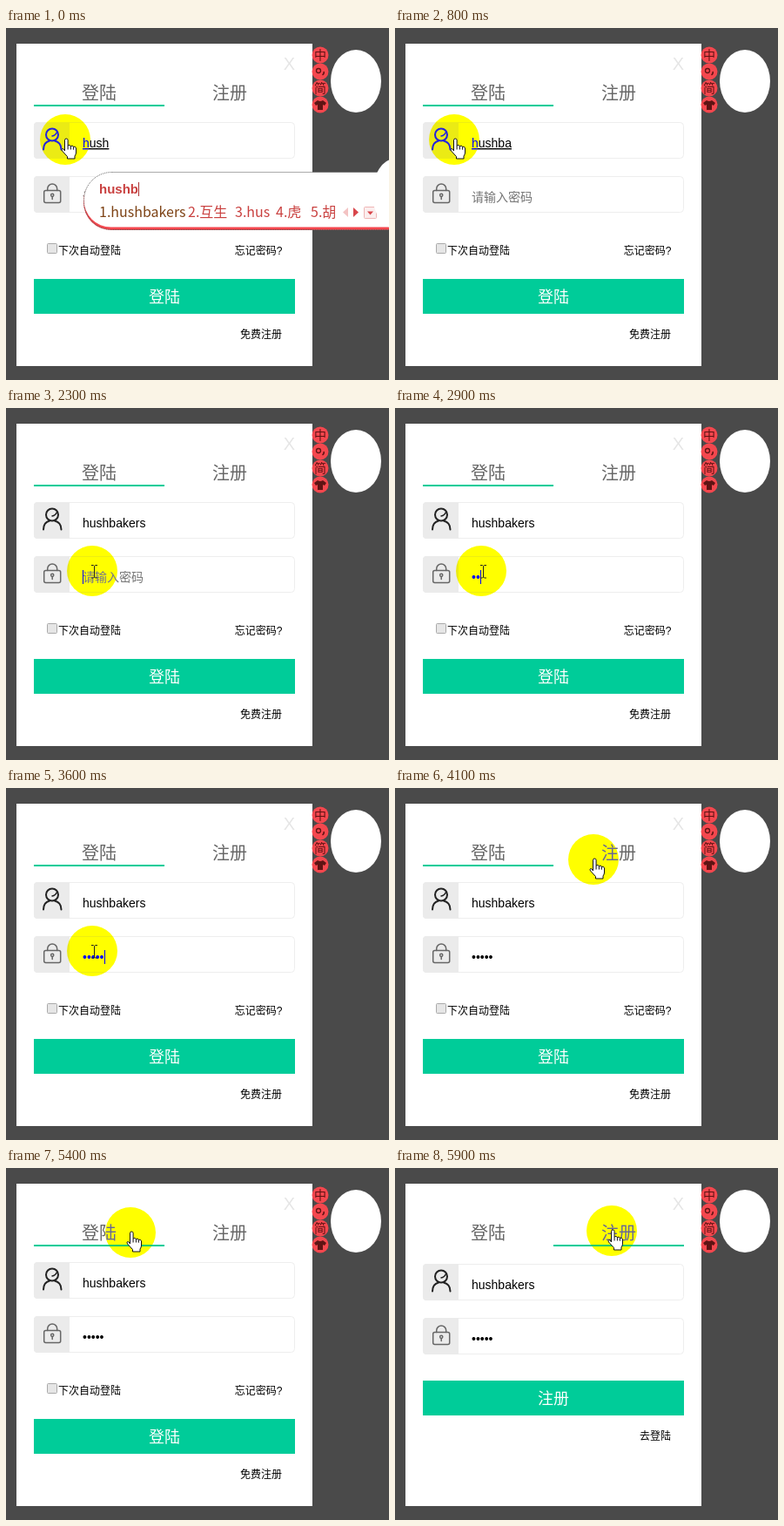
An HTML page that plays this animation: 440 px wide and 404 px high, repeating every 6000 ms.

```html
<!DOCTYPE html>
<html lang="zh-CN">
<head>
<meta charset="utf-8">
<title>登陆</title>
<style>
  html, body { margin: 0; width: 100%; height: 100%; overflow: hidden; background: #4a4a4a; }
  svg { display: block; isolation: isolate; }
  text { font-family: "Liberation Sans", Arial, "Noto Sans CJK SC", "Noto Sans CJK", sans-serif; white-space: pre; }
  .tab { font-size: 20px; fill: #666; text-anchor: middle; }
  .field { font-size: 14px; fill: #000; }
  .small { font-size: 12px; fill: #000; }
  .end { text-anchor: end; }
  .button { font-size: 18px; fill: #fff; text-anchor: middle; }
  .green { fill: #00cc99; }
  .line { fill: none; stroke: #222; stroke-width: 2; stroke-linecap: round; }
  .lock { stroke: #666; stroke-width: 1.5; }
  .cand { font: 16px "Noto Sans CJK SC", "Noto Sans CJK", sans-serif; fill: #c9403f; }
  .badge { font-size: 14px; fill: #5e1414; text-anchor: middle; }
  #spot { fill: #00f; mix-blend-mode: difference; }
  #typed.composing { text-decoration: underline; }
</style>
</head>
<body>
<svg width="440" height="404" viewBox="0 0 440 404">
  <defs>
    <g id="box">
      <rect x="32.5" y="108.5" width="299" height="41" rx="4" fill="#fff" stroke="#eee"/>
      <path d="M73 108H36a4 4 0 0 0-4 4v34a4 4 0 0 0 4 4h37z" fill="#ebebeb"/>
    </g>
  </defs>

  <rect width="440" height="404" fill="#4a4a4a"/>
  <rect x="12" y="18" width="340" height="370" fill="#fff"/>
  <text x="325.5" y="48" font-size="20" fill="#e6e6e6" text-anchor="middle">X</text>
  <text class="tab" x="107" y="82">登陆</text>
  <text class="tab" x="257" y="82">注册</text>
  <rect id="bar" class="green" x="32" y="88" width="150" height="2"/>

  <g id="fields">
    <use href="#box"/>
    <g class="line">
      <circle cx="53" cy="122.5" r="7"/>
      <path d="M43 139.5c0-6 3-9 7-10M63.5 139.5c0-6-3.5-9-7.5-10"/>
      <path d="M53 124c3-.5 4.500-2 5.500-4.500" stroke-width="1.500"/>
    </g>
    <text id="typed" class="field" x="88" y="137"></text>

    <use href="#box" y="62"/>
    <g class="line lock">
      <rect x="43.700" y="186.500" width="19" height="14" rx="2"/>
      <path d="M47.700 186.500v-2a5.500 5.500 0 0 1 11 0v2M53.200 193.500v3"/>
      <circle cx="53.200" cy="191.800" r="1.600"/>
    </g>
    <text id="hint" class="field" x="88" y="199" style="fill:#757575">请输入密码</text>
    <text id="dots" class="field" x="88" y="199"></text>
    <rect id="caret" y="186" width="1" height="16"/>
  </g>

  <g id="login">
    <rect x="47.500" y="247.500" width="11" height="11" rx="1" fill="#e6e6e6" stroke="#aaa"/>
    <text class="small" x="60" y="260">下次自动登陆</text>
    <text class="small end" x="317.500" y="260">忘记密码?</text>
    <rect class="green" x="32" y="288" width="300" height="40"/>
    <text class="button" x="182" y="315">登陆</text>
    <text class="small end" x="317" y="356">免费注册</text>
  </g>
  <g id="register">
    <rect class="green" x="32" y="244" width="300" height="40"/>
    <text class="button" x="182" y="271">注册</text>
    <text class="small end" x="317" y="312">去登陆</text>
  </g>

  <!-- input method bar -->
  <g fill="#f4474e">
    <circle cx="361" cy="31" r="9.500"/>
    <circle cx="361" cy="50" r="9.500"/>
    <circle cx="361" cy="69" r="9.500"/>
    <circle cx="361" cy="88" r="9.500"/>
  </g>
  <text class="badge" x="361" y="36">中</text>
  <circle cx="359" cy="49" r="2.500" fill="none" stroke="#5e1414" stroke-width="1.300"/>
  <path d="M365 50q1 2-1.500 4" fill="none" stroke="#5e1414" stroke-width="1.500"/>
  <text class="badge" x="361" y="74">简</text>
  <path d="M358 83q3 2 6 0l4 3-2 3-2-1v6h-6v-6l-2 1-2-3z" fill="#5e1414"/>
  <ellipse cx="402" cy="61" rx="29" ry="36" fill="#fff"/>

  <circle id="spot" r="29"/>

  <g id="popup">
    <rect x="89" y="167" width="400" height="65" rx="32" fill="#f4474e"/>
    <rect x="89.500" y="165.500" width="400" height="63" rx="31" fill="#fff"/>
    <rect x="89.500" y="165.500" width="400" height="66" rx="32" fill="none" stroke="#555" stroke-dasharray="1 1"/>
    <text id="pinyin" x="107" y="190" font-size="15" font-weight="bold" fill="#c9403f"></text>
    <rect id="pinCaret" y="177" width="1" height="16" fill="#a33"/>
    <text class="cand" x="107" y="217" style="fill:#7d4214">1.hushbakers</text>
    <text class="cand" x="209" y="217">2.互生</text>
    <text class="cand" x="263" y="217">3.hus</text>
    <text class="cand" x="310" y="217">4.虎</text>
    <text class="cand" x="350" y="217">5.胡</text>
    <path d="M393 206v11l-6-5.500z" fill="#f3c3c3"/>
    <path d="M399 206v11l6-5.500z" fill="#d8454a"/>
    <rect x="411.500" y="205.500" width="14" height="13" rx="1" fill="#fbeeee" stroke="#efb5b5"/>
    <path d="M415 210.500h7l-3.500 4z" fill="#d8454a"/>
    <ellipse cx="447" cy="190" rx="26" ry="40" fill="#fff"/>
  </g>

  <g id="pointer">
    <path id="hand" fill="#fff" stroke="#111" stroke-linejoin="round"
      d="M-.5 13V.8a1.800 1.800 0 0 1 3.600 0V7q2-1.500 3.300.500 2-1 3 .700 2.600-.700 3.100 1.800v5q0 2-1.500 4v3H2.500v-2.500L-3.500 13q-1.500-2 .500-2.500 1.200 0 2.500 2.500zM3.100 7v4.500M6.400 7.500v4M9.400 8.200v3.500"/>
    <path id="beam" fill="none" stroke="#222"
      d="M-1 -6.500h2.500l1 1 1-1H6M2.500-5.500V7M-1 8h2.500l1-1 1 1H6"/>
  </g>
</svg>
<script>
const LOOP = 6000, STEP = 100;
const NAME = 'hushbakers';
const el = {};
document.querySelectorAll('[id]').forEach(e => el[e.id] = e);

// [time, x, y] of the pointer
const path = [
  [0, 68, 128], [1300, 68, 128], [1700, 99, 187], [3600, 99, 187], [3700, 92, 191],
  [4100, 228, 82], [4300, 250, 74], [4500, 250, 74], [4800, 152, 73], [5000, 108, 74],
  [5300, 108, 74], [5700, 249, 72], [LOOP, 249, 72]
];
const dotTimes = [2700, 2900, 3100, 3200, 3400];

const show = (e, on) => e.setAttribute('visibility', on ? 'visible' : 'hidden');
const within = (t, a, b) => t >= a && t < b;

function pointerAt(t) {
  const i = path.findIndex(p => p[0] > t);
  const [t0, x0, y0] = path[i - 1], [t1, x1, y1] = path[i];
  const k = (t - t0) / (t1 - t0);
  return [Math.round(x0 + (x1 - x0) * k), Math.round(y0 + (y1 - y0) * k)];
}

function draw(t) {
  const letters = t < 100 ? 4 : t < 500 ? 5 : t < 900 ? 6 : NAME.length;
  el.typed.textContent = NAME.slice(0, letters);
  el.typed.classList.toggle('composing', t < 900);

  show(el.popup, t < 800);
  el.pinyin.textContent = NAME.slice(0, t < 600 ? 5 : 6);
  el.pinCaret.setAttribute('x', 107 + Math.round(el.pinyin.getComputedTextLength()));

  const dots = dotTimes.filter(d => d <= t).length;
  el.dots.textContent = '•'.repeat(dots);
  show(el.hint, !dots);
  el.caret.setAttribute('x', 88 + Math.round(dots * 4.9));
  const blinkOn = t < 3400 || Math.floor((t - 3400) / 500) % 2 === 0;
  show(el.caret, within(t, 2200, 4400) && blinkOn);

  const reg = within(t, 4400, 5100) || t >= 5800;
  show(el.login, !reg);
  show(el.register, reg);
  el.bar.setAttribute('x', reg ? 182 : 32);
  el.fields.setAttribute('transform', `translate(0 ${reg ? 2 : 0})`);

  const move = `translate(${pointerAt(t)})`;
  el.spot.setAttribute('transform', move);
  el.pointer.setAttribute('transform', move);
  const overField = within(t, 1500, 3900);
  show(el.hand, !overField);
  show(el.beam, overField);
}

function tick() {
  const t = performance.now() % LOOP;
  draw(Math.floor(t / STEP) * STEP);
  requestAnimationFrame(tick);
}
tick();
</script>
</body>
</html>
```
